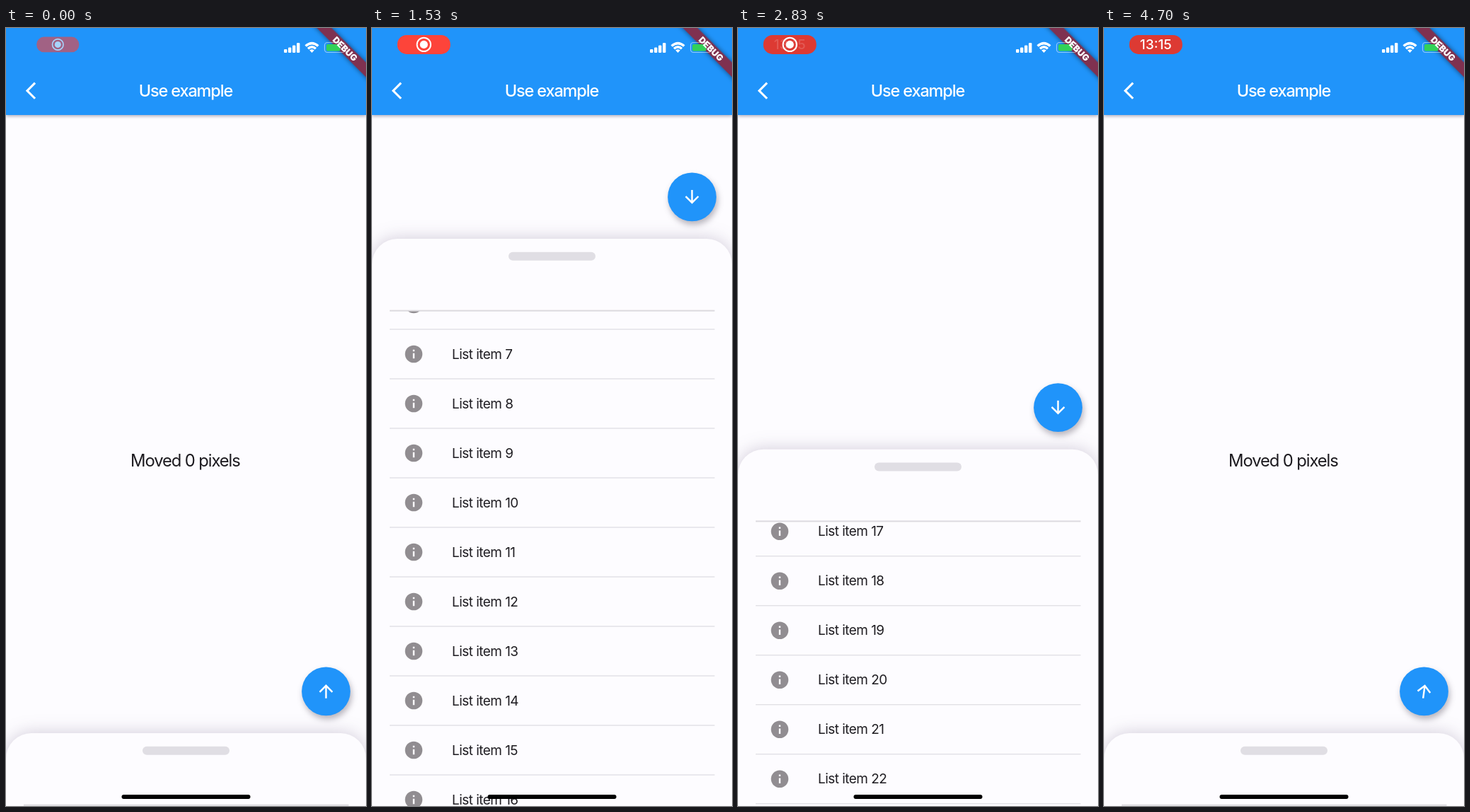
An HTML page that plays this animation: 509 by 1100 pixels, repeating every 4.73 s.

```html
<!DOCTYPE html>
<html lang="en">
<head>
<meta charset="utf-8">
<title>Snapping sheet</title>
<style>
  html, body { margin: 0; width: 100%; height: 100%; overflow: hidden; background: #fdfcff; }
  svg { display: block; width: 100vw; height: 100vh; }
  text { font-family: Inter, "Open Sans", sans-serif; font-optical-sizing: none; }
  .white { fill: #fff; }
  .blue { fill: #2094fa; }
  .middle { text-anchor: middle; }
  .label { font-size: 23.8px; letter-spacing: -1.1px; }
  .title { font-size: 23.5px; letter-spacing: -1.15px; font-weight: 500; }
  .item { font-size: 19px; letter-spacing: -.55px; fill: #1f1d22; }
  #bar { filter: drop-shadow(0 2px 2px rgba(20, 20, 60, .32)); }
  #panel { filter: drop-shadow(0 0 12px rgba(70, 50, 95, .25)); }
  #disc { filter: drop-shadow(2px 5px 4px rgba(40, 30, 50, .32)); }
  #ribbon { filter: drop-shadow(0 0 3.5px rgba(0, 0, 0, .5)); }
</style>
</head>
<body>
<svg viewBox="0 0 509 1100" preserveAspectRatio="none">
  <defs>
    <clipPath id="listClip"><rect y="102" width="509" height="1100"/></clipPath>
  </defs>
  <rect width="509" height="1100" fill="#fdfcff"/>
  <text id="moved" class="middle label" x="253.4" y="620" fill="#1c1a1f"></text>

  <g id="sheet">
    <path id="panel" d="M0 1300V36A36 36 0 0 1 36 0H473A36 36 0 0 1 509 36V1300Z" fill="#fdfcff"/>
    <rect x="193" y="18.7" width="123" height="12" rx="6" fill="#e0dee4"/>
    <g clip-path="url(#listClip)"><g id="list"></g></g>
    <rect x="25" y="100.7" width="459.5" height="2" fill="#dcdadf"/>
    <g transform="translate(452.5 -59.1)">
      <circle id="disc" class="blue" r="34.4"/>
      <path id="arrow" class="white" d="M-8 0L-6.59 1.41L-1-4.17V8H1V-4.17L6.58 1.42L8 0L0-8Z"/>
    </g>
  </g>

  <rect id="bar" class="blue" width="509" height="123"/>
  <path class="white" transform="translate(27.8 73.9) scale(1.229)" d="M11.67 3.87L9.9 2.1L0 12L9.9 21.9L11.67 20.13L3.54 12Z"/>
  <text class="middle title white" x="254" y="97">Use example</text>

  <g id="pill">
    <rect id="pillBody" x="-37.5" y="-13.5" width="75" height="27" rx="13"/>
    <g id="record">
      <circle r="9.7" fill="none" stroke="#fff" stroke-width="2"/>
      <circle class="white" r="5.6"/>
    </g>
    <text id="clock" class="middle white" y="6.8" font-size="19" font-weight="500">13:15</text>
  </g>

  <g id="signal" class="white"></g>
  <g fill="none" stroke="#fff" stroke-width="3.4">
    <path d="M423.6 25.6Q432.5 17.6 441.4 25.6"/>
    <path d="M427 29.3Q432.5 24.4 438 29.3"/>
  </g>
  <path class="white" d="M432.5 35L429.2 31.6Q432.5 28.9 435.8 31.6Z"/>

  <g transform="translate(509 0) rotate(45)">
    <rect id="ribbon" x="-60" y="34.4" width="120" height="14.75" fill="#7f3150"/>
  </g>
  <rect x="450.5" y="20.5" width="29" height="14" rx="4" fill="none" stroke="#fff" stroke-opacity=".5" stroke-width="1.2"/>
  <rect x="453" y="23" width="19.5" height="9.5" rx="2" fill="#32d158"/>
  <text class="middle white" transform="translate(509 0) rotate(45)" y="46.3" font-size="12.4" font-weight="900">DEBUG</text>

  <rect x="163.5" y="1084" width="182" height="6" rx="3"/>
</svg>
<script>
const LOOP = 4730, CLOSED = 997, PX_PER_POINT = 1.229, ROW = 70;
const $ = id => document.getElementById(id);

const linear = u => u;
const quadIn = u => u * u;
const sineInOut = u => (1 - Math.cos(Math.PI * u)) / 2;
const cubicOut = u => 1 - (1 - u) ** 3;
const expoOut = u => u >= 1 ? 1 : 1 - 2 ** (-10 * u);
const elasticOut = u => u >= 1 ? 1 : 1 + 2 ** (-10 * u) * Math.sin((u - .1) * 5 * Math.PI);

const progress = (t, start, length) => Math.min(1, Math.max(0, (t - start) / length));

// Keys are [time, value, easing that leads to this key].
function track(keys, t) {
  const next = keys.findIndex(key => key[0] > t);
  if (next === 0) return keys[0][1];
  if (next < 0) return keys[keys.length - 1][1];
  const [t0, v0] = keys[next - 1], [t1, v1, ease = linear] = keys[next];
  return v0 + (v1 - v0) * ease((t - t0) / (t1 - t0));
}

const sheetKeys = [
  [40, CLOSED], [330, 362, sineInOut], [830, 298, expoOut],
  [2700, 298], [2830, 595, quadIn], [3330, 648, expoOut],
  [3604, 848, quadIn], [4354, CLOSED, elasticOut]
];
const scrollKeys = [
  [1000, 0], [1120, 200], [1530, 490, cubicOut],
  [1600, 490], [1750, 808], [2350, 1237, cubicOut]
];

$("list").innerHTML = Array.from({ length: 32 }, (_, i) => `
  <g transform="translate(0 ${163 + i * ROW})">
    <circle cx="59" r="12.3" fill="#918d91"/>
    <path d="M57.8-6.2h2.4v2.5h-2.4zM57.8-1.2h2.4v7.4h-2.4z" fill="#fdfcff"/>
    <text class="item" x="113" y="6.7">List item ${i}</text>
    <rect x="25" y="34.4" width="459.5" height="1.2" fill="#dddce2"/>
  </g>`).join("");

$("signal").innerHTML = [5, 7.5, 10.5, 14].map((h, i) =>
  `<rect x="${393 + i * 6}" y="${35 - h}" width="4.4" height="${h}" rx="1.2"/>`).join("");

function drawPill(t) {
  const enter = progress(t, 0, 180);
  const glow = .5 - .5 * Math.cos(2 * Math.PI * (t - 680) / 2050);
  const mix = (dark, bright) => Math.round(dark + (bright - dark) * glow);
  $("pill").setAttribute("transform", `translate(73.3 23.4) scale(${.8 + .2 * enter})`);
  $("pill").setAttribute("opacity", .6 + .4 * enter);
  $("pillBody").setAttribute("fill", `rgb(${mix(220, 255)},${mix(58, 69)},${mix(51, 58)})`);
  $("record").setAttribute("opacity", 1 - progress(t, 2830, 170));
  $("clock").setAttribute("opacity", progress(t, 2800, 200));
}

function draw(t) {
  const top = track(sheetKeys, t);
  const turn = elasticOut(progress(t, 830, 800)) - elasticOut(progress(t, 4354, 800));
  $("sheet").setAttribute("transform", `translate(0 ${top})`);
  $("list").setAttribute("transform", `translate(0 ${-track(scrollKeys, t)})`);
  $("arrow").setAttribute("transform", `rotate(${180 * turn}) scale(1.229)`);
  $("moved").textContent = `Moved ${Math.trunc((CLOSED - top) / PX_PER_POINT)} pixels`;
  drawPill(t);
}

const start = performance.now();
function frame() {
  draw((performance.now() - start) % LOOP);
  requestAnimationFrame(frame);
}
frame();
</script>
</body>
</html>
```
